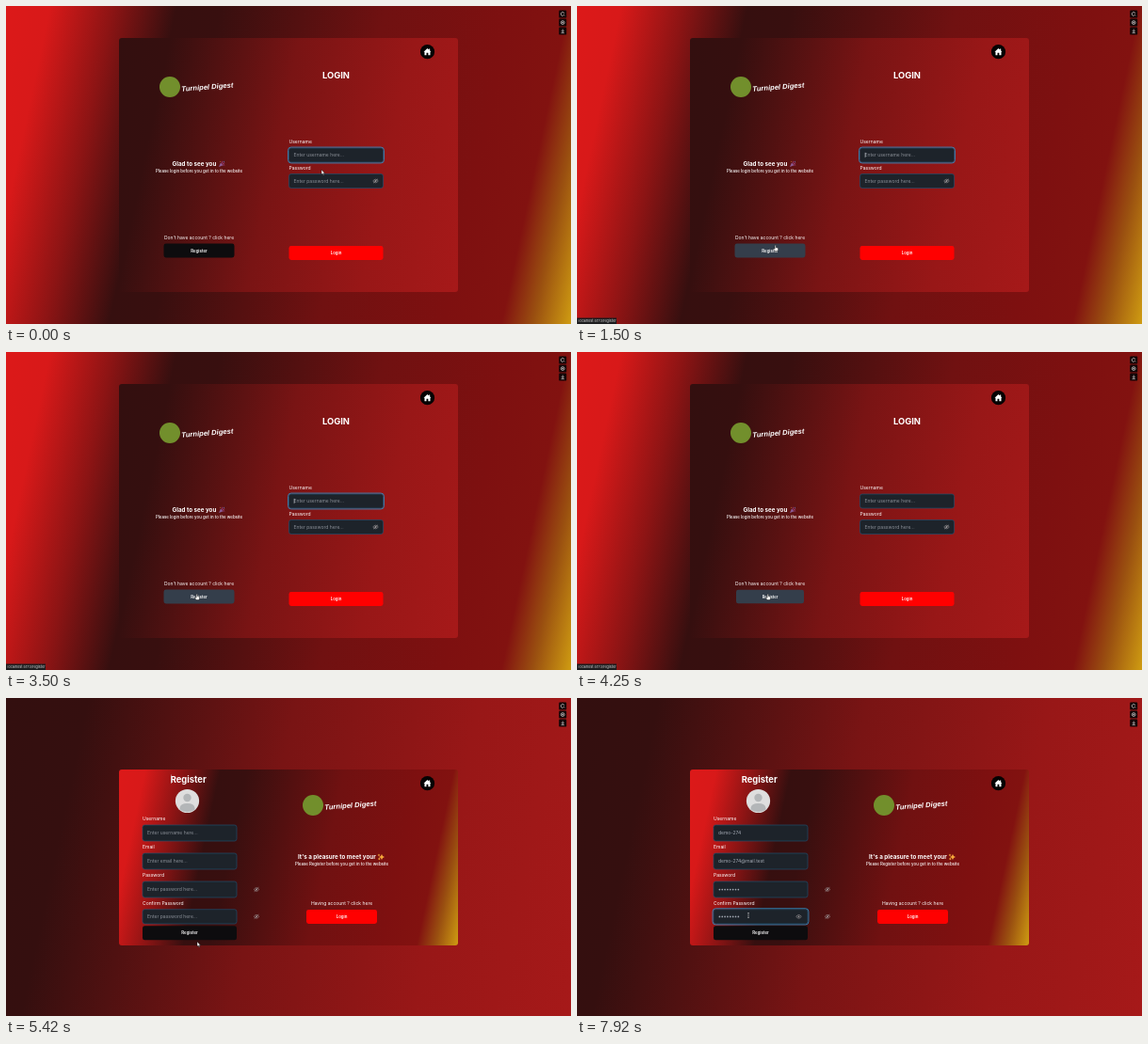
An HTML page for the animation above (8000 ms loop, 600 px wide and 338 px high).

```html
<!DOCTYPE html>
<html lang="en">
<head>
<meta charset="utf-8">
<title>Login and register</title>
<style>
  html, body { margin: 0; width: 100%; height: 100%; overflow: hidden; background: #300f0f; }
  #stage { position: relative; width: 600px; height: 338px; overflow: hidden; }
  #card { position: absolute; left: 120px; width: 360px; border-radius: 3px; }
  svg { position: absolute; left: 0; top: 0; }
  .vivid { background: linear-gradient(102deg, #dc1919 0%, #d81919 7%, #8c1414 17%, #360f0f 27%, #380f0f 34%, #701111 60%, #7e1010 80%, #821210 89%, #9a5010 94%, #cf9c12 100%); }
  .deep { background: linear-gradient(102deg, #330f0f 0%, #350f0f 13%, #791414 46%, #981717 75%, #a61919 100%); }
  text { font-family: Inter, sans-serif; font-size: 5px; fill: #fff; }
  .title { font-size: 9.375px; font-weight: 700; }
  .lead { font-size: 6.25px; font-weight: 700; }
  .small { font-size: 4.375px; font-weight: 500; }
  .btn { font-size: 4.375px; font-weight: 600; }
  .hint { fill: #8b9098; }
  .value { fill: #a3a9b3; }
  .brand { font: italic 700 7.6px "Liberation Sans", sans-serif; }
  .mid { text-anchor: middle; }
</style>
</head>
<body>
<div id="stage">
  <div id="card"></div>
  <svg id="ui" width="600" height="338" viewBox="0 0 600 338"></svg>
</div>
<script>
const FPS = 12, FRAMES = 96, REGISTER_PAGE = 52;
const stage = document.getElementById('stage');
const card = document.getElementById('card');
const ui = document.getElementById('ui');

// Pointer stops: frame, x, y
const POINTER = [
  [0, 335, 174], [3, 328, 178], [10, 264, 222], [15, 213, 256], [18, 211, 257], [20, 211, 257],
  [24, 258, 214], [29, 327, 162], [34, 333, 158], [36, 328, 162], [40, 213, 247], [42, 203, 260],
  [51, 203, 260], [65, 203, 259], [68, 188, 200], [71, 180, 144], [73, 180, 146], [74, 180, 173],
  [76, 181, 203], [78, 182, 231], [96, 182, 231]
];

const REGISTER_FIELDS = [
  { label: 'Username', hint: 'username', y: 135, h: 17, start: 71, rate: 3, value: 'demo-274' },
  { label: 'Email', hint: 'email', y: 165, h: 17, start: 74, rate: 9, value: 'demo-274@mail.test' },
  { label: 'Password', hint: 'password', y: 195, h: 17, start: 76, rate: 4, value: 'abcdefgh', secret: true },
  { label: 'Confirm Password', hint: 'password', y: 224.7, h: 15.3, start: 78, rate: .8, value: 'abcdefgh', secret: true }
];

const within = (f, a, b) => f >= a && f < b;
const text = (x, y, s, cls = '') => `<text x="${x}" y="${y}" class="${cls}">${s}</text>`;
const rect = (x, y, w, h, fill, rx = 2.4, extra = '') =>
  `<rect x="${x}" y="${y}" width="${w}" height="${h}" rx="${rx}" fill="${fill}" ${extra}/>`;
const circle = (x, y, r, fill) => `<circle cx="${x}" cy="${y}" r="${r}" fill="${fill}"/>`;
const path = (d, fill, extra = '') => `<path d="${d}" fill="${fill}" ${extra}/>`;
const at = (x, y, content) => `<g transform="translate(${x} ${y})">${content}</g>`;

function pointerAt(f) {
  const i = POINTER.findIndex(stop => stop[0] > f);
  const [fa, xa, ya] = POINTER[i - 1], [fb, xb, yb] = POINTER[i];
  const k = (f - fa) / (fb - fa), ease = k * k * (3 - 2 * k);
  return [xa + (xb - xa) * ease, ya + (yb - ya) * ease];
}

function button(x, y, w, h, label, fill, scale = 1) {
  const cx = x + w / 2, cy = y + h / 2;
  return `<g transform="translate(${cx} ${cy}) scale(${scale})">` +
    rect(-w / 2, -h / 2, w, h, fill) + text(0, 1.55, label, 'btn mid') + '</g>';
}

function field(x, y, h, label, hint, focused, content) {
  const ring = focused
    ? rect(x - .9, y - .9, 101.8, h + 1.8, 'none', 3.2, 'stroke="#2f8fc4" stroke-width=".9"') : '';
  return text(x, y - 4.6, label) + ring +
    rect(x, y, 100, h, '#1d232a', 2.4, 'stroke="#1f5577" stroke-width=".6"') +
    (content || text(x + 5, y + h / 2 + 1.8, `Enter ${hint} here...`, 'hint'));
}

const dots = (x, y, n) =>
  Array.from({ length: n }, (_, i) => circle(x + i * 2.85, y, .85, '#a3a9b3')).join('');

const caret = (x, y, h) => rect(x, y, .5, h, '#d8dce2', 0);

function eye(x, y, slashed) {
  const stroke = 'stroke="#a09a9c" stroke-width=".6"';
  return at(x, y, path('M-2.8 0Q0 -3.6 2.8 0Q0 3.6 -2.8 0Z', 'none', stroke) +
    circle(0, 0, .9, '#a09a9c') + (slashed ? path('M-2.4 2.2L2.4 -2.2', 'none', stroke) : ''));
}

const home = y => at(447.5, y, circle(0, 0, 7.6, '#050303') +
  path('M-4 .1L0 -3.6L1.6 -2.2V-3.2H2.7V-1.2L4 .1H3V3.5H.9V1H-1V3.5H-3V.1Z', '#fff'));

const brand = (x, y) => at(x, y, circle(0, 0, 11, '#728f2c') +
  `<g transform="translate(12.5 4.8) rotate(-4.5)">${text(0, 0, 'Turnipel Digest', 'brand')}</g>`);

const popper = at(229, 168, path('M-3 3L-1 -1.6L1.7 1.3Z', '#8c5a93') +
  path('M.2 -.6Q1.4 -2 .5 -3.2M1 .2Q2 -1.5 3.2 -1.1M1.5 1Q2.4 .5 3.2 1.4', 'none', 'stroke="#b54fa0" stroke-width=".7"') +
  circle(-1.4, -2.7, .5, '#d07a3c') + circle(2.5, -2.7, .5, '#5f7fc9'));

const star = (x, y, r) => at(x, y,
  path(`M0 ${-r}Q${r * .2} ${-r * .2} ${r} 0Q${r * .2} ${r * .2} 0 ${r}Q${-r * .2} ${r * .2} ${-r} 0Q${-r * .2} ${-r * .2} 0 ${-r}Z`, '#f5a83a'));
const sparkles = star(399, 169, 3) + star(396, 167, 1.4) + star(396.3, 171, 1.5);

function sideTools() {
  const line = 'stroke="#ddd" stroke-width=".7"';
  const glyphs = [
    path('M1.7 -.7A1.9 1.9 0 1 0 .5 1.7M.7 .4L2 1.7', 'none', line),
    path('M-1.9 0A1.9 1.9 0 1 0 1.9 0A1.9 1.9 0 1 0 -1.9 0M-.9 0H.9M0 -.9V.9', 'none', line),
    path('M0 -2V.7M-1.3 -.4L0 .9L1.3 -.4M-1.6 2H1.6', 'none', line)
  ];
  return glyphs.map((g, i) => at(591.2, 8.6 + i * 9, rect(-4, -4, 8, 8, '#120607', 1.2) + g)).join('');
}

const status = rect(0, 331.5, 42, 6.5, '#1c1c1e', 0) +
  `<text x="1.5" y="336.2" style="font-size:3.75px;fill:#d5d5d5">localhost:5173/register</text>`;

function pointer(x, y, kind) {
  const edge = 'stroke="#111" stroke-width=".45"';
  const shapes = {
    arrow: path('M0 0V5L1.2 4L2 5.8L2.9 5.4L2.1 3.7H3.6Z', '#fff', edge),
    hand: path('M-.9 -2.4Q-.3 -3 .3 -2.4V-.3L2 .1Q2.8 .4 2.6 1.5L2 3.6H-1.1L-2.5 1.2Q-2.1 .5 -.9 1.3Z', '#fff', edge),
    beam: path('M-1 -2.6Q0 -2.6 0 -2V2Q0 2.6 -1 2.6M1 -2.6Q0 -2.6 0 -2M1 2.6Q0 2.6 0 2', 'none', 'stroke="#bbb" stroke-width=".6"')
  };
  return at(x, y, shapes[kind]);
}

function loginPage(f, hover) {
  const focused = f < 50;
  return brand(174, 86) + text(350.5, 77.2, 'LOGIN', 'title mid') + home(48.7) +
    text(176.5, 170.4, 'Glad to see you', 'lead') + popper +
    text(205, 177.3, 'Please login before you get in to the website', 'small mid') +
    field(300.5, 151, 15, 'Username', 'username', focused) +
    (focused && f % 12 > 4 ? caret(305.8, 155.8, 5.3) : '') +
    field(300.5, 178.5, 15, 'Password', 'password', false) + eye(392.5, 186, true) +
    text(205, 248.1, "Don't have account ? click here", 'mid') +
    button(167.5, 252.5, 75, 15, 'Register', hover ? '#343e4b' : '#0d0c0e', f >= 50 ? .96 : 1) +
    button(300.5, 255, 100, 15, 'Login', '#ff0000');
}

function registerField(item, i, f) {
  const { label, hint, y, h, start, rate, value, secret } = item;
  const next = REGISTER_FIELDS[i + 1];
  const focused = within(f, start, next ? next.start : FRAMES);
  const typed = value.slice(0, Math.max(0, Math.floor((f - start) * rate)));
  const middle = y + h / 2;
  const content = typed && (secret
    ? dots(151.4, middle + .1, typed.length)
    : text(150, middle + 1.8, typed, 'value'));
  return field(145, y, h, label, hint, focused, content) +
    (secret ? eye(266, middle, true) : '') +
    (secret && focused && typed ? eye(235.5, middle, false) : '');
}

function registerPage(f) {
  return text(193.7, 90, 'Register', 'title mid') + (f < 71 ? caret(175, 81.5, 9.5) : '') +
    circle(192.5, 109.5, 12.6, '#dedede') + circle(192.5, 106, 4.2, '#b3b6b8') +
    path('M184.5 118.8V117Q185 112 192.5 112Q200 112 200.5 117V118.8Q192.5 123.6 184.5 118.8Z', '#b3b6b8') +
    REGISTER_FIELDS.map((item, i) => registerField(item, i, f)).join('') +
    button(145, 242.3, 100, 15, 'Register', '#0d0c0e') +
    brand(326, 114) + home(90.7) +
    text(310, 171, "It's a pleasure to meet your", 'lead') + sparkles +
    text(356.5, 178, 'Please Register before you get in to the website', 'small mid') +
    text(356.5, 220.4, 'Having account ? click here', 'mid') +
    button(319, 225, 75, 15, 'Login', '#ff0000');
}

function draw(f) {
  const registering = f >= REGISTER_PAGE;
  const hover = within(f, 15, 21) || within(f, 41, REGISTER_PAGE);
  const showStatus = within(f, 15, 24) || within(f, 42, 58);
  const overField = within(f, 29, 36) || f >= 71;
  const kind = hover ? 'hand' : overField ? 'beam' : 'arrow';

  stage.className = registering ? 'deep' : 'vivid';
  card.className = registering ? 'vivid' : 'deep';
  card.style.top = (registering ? 76 : 34) + 'px';
  card.style.height = (registering ? 186.5 : 270) + 'px';
  ui.innerHTML = (registering ? registerPage(f) : loginPage(f, hover)) +
    sideTools() + (showStatus ? status : '') + pointer(...pointerAt(f), kind);
}

let shown = -1;
function tick() {
  const frame = Math.floor(performance.now() * FPS / 1000 + .1) % FRAMES;
  if (frame !== shown) draw(shown = frame);
  requestAnimationFrame(tick);
}
tick();
</script>
</body>
</html>
```
